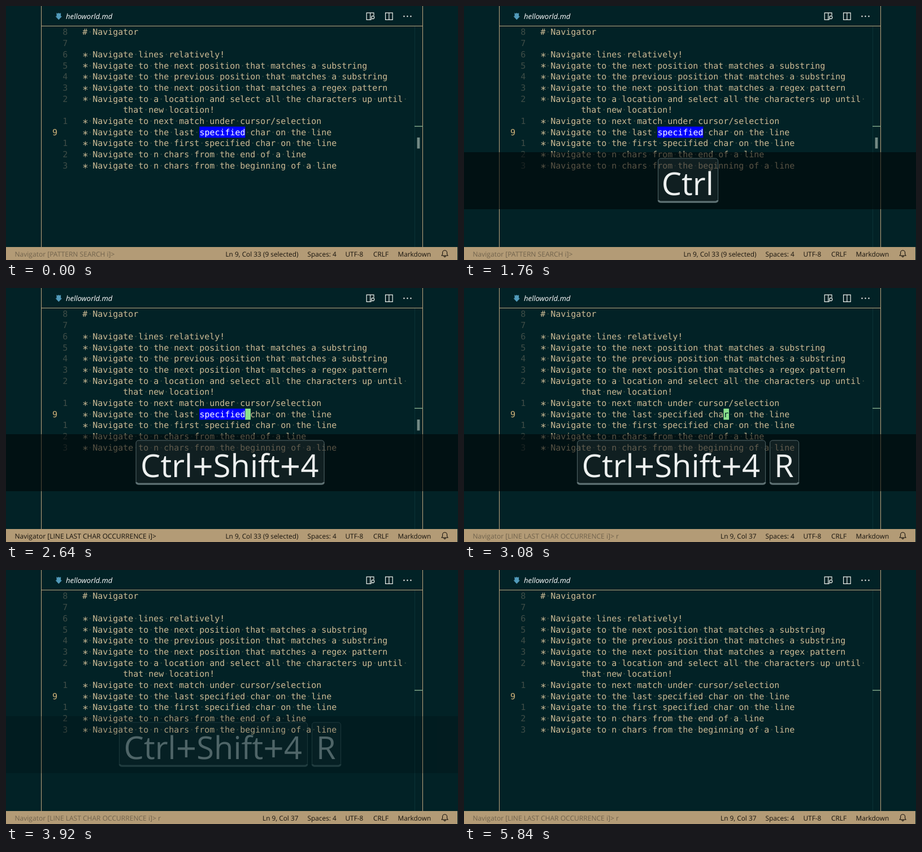
An HTML page for the animation above (5.88 s loop, 800x450 px).

```html
<!DOCTYPE html>
<html lang="en">
<head>
<meta charset="utf-8">
<title>Line navigation</title>
<style>
  html, body { margin: 0; width: 100%; height: 100%; overflow: hidden; background: #022226; }
  svg { display: block; width: 800px; height: 450px; }
  text { white-space: pre; text-rendering: geometricPrecision; }
  .code { font: 14.96px "DejaVu Sans Mono", monospace; fill: #cdbb95; }
  .code .dots { fill: #34493f; }
  .code .number { fill: #3f4d47; text-anchor: end; }
  .code .current { fill: #d2b47a; }
  .code .star { font-size: 18px; }
  .code .selected { fill: #fff; }
  .code .under-cursor { fill: #022226; }
  .ui { font: 11.85px "Open Sans", sans-serif; fill: #17130d; }
  .title { font: italic 13px "Open Sans", sans-serif; fill: #fff; }
  .icons { fill: none; stroke: #f0f0ec; stroke-width: 1.2; }
  .key { font: 56px "Open Sans", sans-serif; fill: #eef1f0; text-anchor: middle; }
</style>
</head>
<body>
<svg viewBox="0 0 800 450">
  <rect width="800" height="450" fill="#022226"/>
  <path d="M723.5 36V427" stroke="#0b3236"/>
  <path d="M62.5 0V428M737.5 0V428M62 35.5H738" stroke="#bfa57e"/>

  <path d="M89.5 12l2 1.4 1.8-1.4 1.8 1.4 2-1.4v6.3h2l-5.8 6.2-5.8-6.2h2z" fill="#519aba"/>
  <text x="106" y="23" class="title">helloworld.md</text>
  <g class="icons">
    <path d="M645 24.3H638.2V12.2H651V17M644.7 12.2V24.3"/>
    <circle cx="649.3" cy="20.2" r="2.5"/>
    <path d="M647.6 22L645.5 25"/>
    <path d="M671.6 12.2H684.2V24.3H671.6zM677.9 12.2V24.3"/>
    <path d="M704.5 18.3h.01M710.5 18.3h.01M716.5 18.3h.01" stroke-width="2.4" stroke-linecap="round"/>
  </g>

  <g id="code" class="code"></g>
  <path d="M723 213.2H737.5" stroke="#759a80" stroke-width="1.6"/>
  <g id="selection" class="code">
    <rect x="342.2" y="213.7" width="81.2" height="19.7" fill="#00f"/>
    <text x="342.4" y="228.7" class="selected">specified</text>
    <rect x="727.6" y="233" width="4.8" height="19.5" fill="#748a85"/>
  </g>
  <g id="cursor" class="code">
    <rect y="213.7" width="9.6" height="19.7" fill="#8be28d"/>
    <text y="228.7" class="under-cursor"></text>
  </g>

  <rect y="427" width="799" height="23" fill="#b39b76"/>
  <g class="ui">
    <text id="mode" x="15.5" y="443.5" style="font-size:12.05px"></text>
    <text id="position" x="517.5" y="443.5" text-anchor="end"></text>
    <text x="533.5" y="443.5">Spaces: 4</text>
    <text x="600.5" y="443.5">UTF-8</text>
    <text x="650" y="443.5">CRLF</text>
    <text x="693.5" y="443.5">Markdown</text>
  </g>
  <path d="M771.2 442.3H782L780.6 439.7V437A4 4 0 0 0 772.6 437V439.7zM775 442.8a1.6 1.8 0 0 0 3.2 0" fill="none" stroke="#17130d" stroke-width="1.1"/>

  <g id="overlay">
    <rect y="259" width="800" height="101" fill="#000406" fill-opacity=".57"/>
    <g id="keys"></g>
  </g>
</svg>
<script>
const LOOP = 5880, COMMAND = 2180, JUMP = 3000;
const CHAR = 9.006, ROW = 19.7, LEFT = 135.2;
const KEY_WIDTHS = { "Ctrl": 107, "Ctrl+Shift": 258, "Ctrl+Shift+4": 334, "R": 52 };
const ROWS = [
  [8, "# Navigator"],
  [7, ""],
  [6, "* Navigate lines relatively!"],
  [5, "* Navigate to the next position that matches a substring"],
  [4, "* Navigate to the previous position that matches a substring"],
  [3, "* Navigate to the next position that matches a regex pattern"],
  [2, "* Navigate to a location and select all the characters up until "],
  ["", "that new location!", 8],
  [1, "* Navigate to next match under cursor/selection"],
  [9, "* Navigate to the last specified char on the line"],
  [1, "* Navigate to the first specified char on the line"],
  [2, "* Navigate to n chars from the end of a line"],
  [3, "* Navigate to n chars from the beginning of a line"],
];
const $ = id => document.getElementById(id);
const label = (x, y, text, style = "") => `<text x="${x}" y="${y}" class="${style}">${text}</text>`;
const clamp = v => Math.max(0, Math.min(1, v));

$("code").innerHTML = ROWS.map(([number, text, indent = 0], i) => {
  const x = LEFT + indent * CHAR, y = 51.4 + i * ROW;
  const numberLabel = number === 9 ? label(82, y, 9, "current") : label(109.3, y, number, "number");
  const star = text[0] === "*" ? label(135.1, y + 4.8, "*", "star") : "";
  const dots = text.replace(/./g, c => c === " " ? "·" : " ");
  return numberLabel + star + label(x, y, text.replace("*", " ")) + label(x, y, dots, "dots");
}).join("");

function drawKey(name, x) {
  const width = KEY_WIDTHS[name];
  const text = name.replace(/\+([^+]+)/g, '<tspan font-size="64" dy="4.500">+</tspan><tspan dy="-4.500">$1</tspan>');
  return `<rect x="${x + .5}" y="270" width="${width - 1}" height="78" rx="4.5"
      fill="#fff" fill-opacity=".06" stroke="#56686b"/>
    <path d="M${x + 1} 344q.5 3 4 3h${width - 10}q3.5 0 4-3" fill="none" stroke="#5f7274" stroke-width="3"/>`
    + label(x + width / 2 - .8, 334.6, text, "key");
}

let shownKeys;
function showKeys(names) {
  if (names.join() === shownKeys) return;
  shownKeys = names.join();
  const gap = 7;
  const total = names.reduce((sum, name) => sum + KEY_WIDTHS[name] + gap, -gap);
  let x = 396.6 - total / 2;
  $("keys").innerHTML = names.map(name => {
    const key = drawKey(name, x);
    x += KEY_WIDTHS[name] + gap;
    return key;
  }).join("");
}

function showCursor(t, jumped) {
  const since = jumped ? t - JUMP : t >= COMMAND ? t - COMMAND : t + 860;
  const x = LEFT + (jumped ? 36 : 32) * CHAR;
  const [block, letter] = $("cursor").children;
  block.setAttribute("x", x);
  letter.setAttribute("x", x);
  letter.textContent = jumped ? "r" : "";
  $("cursor").style.display = since % 1000 < 500 ? "" : "none";
}

function render() {
  const t = performance.now() % LOOP;
  const jumped = t >= JUMP, active = t >= COMMAND && !jumped;

  $("selection").style.display = jumped ? "none" : "";
  showCursor(t, jumped);

  $("mode").textContent = "Navigator [" +
    (t < COMMAND ? "PATTERN SEARCH" : "LINE LAST CHAR OCCURRENCE") + " i]>" + (jumped ? " r" : "");
  $("mode").style.fill = active ? "#17130d" : "#71634d";
  $("position").textContent = jumped ? "Ln 9, Col 37" : "Ln 9, Col 33 (9 selected)";

  showKeys(t < 1920 ? ["Ctrl"] : t < COMMAND ? ["Ctrl+Shift"]
    : jumped ? ["Ctrl+Shift+4", "R"] : ["Ctrl+Shift+4"]);
  $("overlay").style.opacity = Math.min(clamp((t - 1580) / 170), clamp((3960 - t) / 120));
  requestAnimationFrame(render);
}
render();
</script>
</body>
</html>
```
